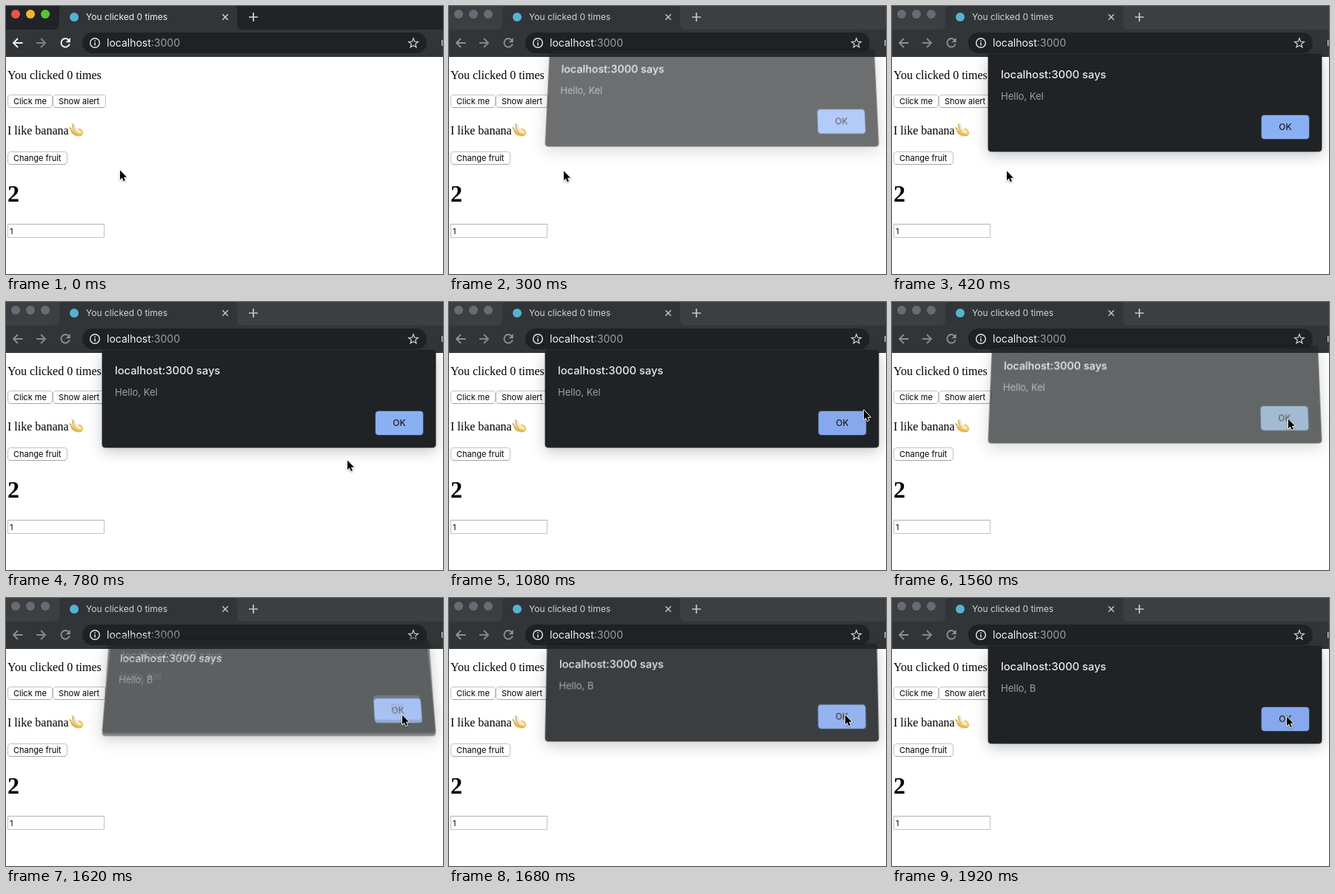
These frames come from a looping animation (590x363 px, 1980 ms). An HTML page with a canvas:

```html
<!DOCTYPE html>
<html lang="en">
<head>
<meta charset="utf-8">
<title>You clicked 0 times</title>
<style>
  html, body { margin: 0; width: 100%; height: 100%; overflow: hidden; background: #fff; }
  canvas, .dialog, #cursor { position: absolute; }
  canvas { left: 0; top: 0; }
  .dialog {
    left: 130px; top: 66px; width: 450px; height: 131px;
    background: #1f2325; border-radius: 4px;
    box-shadow: 0 5px 20px rgba(0, 0, 0, .24), 0 0 0 1px rgba(0, 0, 0, .4);
    transform-origin: 50% 100%; opacity: 0;
    font-family: Inter, sans-serif; white-space: nowrap;
  }
  .dialog * { position: absolute; line-height: 20px; }
  .title { left: 17px; top: 16.5px; font-size: 14.7px; font-weight: 500; color: #e8eaed; }
  .message { left: 17px; top: 46px; font-size: 13px; color: #9aa0a6; }
  .dialog .ok {
    left: 369px; top: 82px; width: 64px; height: 32px; line-height: 32px;
    border-radius: 4px; text-align: center; font-size: 12px; font-weight: 500; color: #202124;
    box-shadow: 0 0 0 1px rgba(138, 176, 244, .25);
  }
  #cursor { left: 0; top: 0; overflow: visible; filter: drop-shadow(0 1px 1px rgba(0, 0, 0, .3)); }
</style>
</head>
<body>
<canvas id="stage" width="590" height="363"></canvas>
<div class="dialog" id="first">
  <div class="title">localhost:3000 says</div>
  <div class="message">Hello, Kel</div>
  <div class="ok">OK</div>
</div>
<div class="dialog" id="second">
  <div class="title">localhost:3000 says</div>
  <div class="message">Hello, B</div>
  <div class="ok">OK</div>
</div>
<svg id="cursor" width="12" height="19">
  <path d="M1 1.5V14.3l2.8-2.7 2 4.6 2.1-.9-2-4.5h4z" fill="#000" stroke="#fff" stroke-width="1.7" stroke-linejoin="round" paint-order="stroke"/>
</svg>
<script>
const LOOP = 1980, STEP = 60;
const SANS = 'Inter, sans-serif', SERIF = '"Liberation Serif", serif';
const $ = id => document.getElementById(id);
const ctx = $('stage').getContext('2d');

// Keys: [time, x, y]
const cursorPath = [
  [60, 153, 221], [120, 154, 222], [540, 154, 222], [600, 176, 222], [720, 405, 215],
  [780, 460, 213], [900, 460, 213], [960, 474, 205], [1080, 559, 145], [1140, 559, 146],
  [1260, 549, 152], [1440, 534, 157], [1860, 534, 157], [1920, 532, 159]
];

// Keys: [time, lift, opacity]
const firstKeys = [
  [180, 22, 0], [240, 15, .33], [300, 7, .66], [360, 2, .9], [420, 0, 1],
  [1500, 0, 1], [1560, 6, .7], [1620, 14.5, .4], [1680, 22, 0]
];
const secondKeys = [[1560, 21, 0], [1620, 10.5, .55], [1680, 3, .88], [1740, 0, 1]];

function at(keys, t) {
  const i = keys.findIndex(k => k[0] > t);
  if (i === 0) return keys[0].slice(1);
  if (i < 0) return keys[keys.length - 1].slice(1);
  const a = keys[i - 1], b = keys[i], p = (t - a[0]) / (b[0] - a[0]);
  return [1, 2].map(n => a[n] + (b[n] - a[n]) * p);
}

function box(x, y, w, h, r, fill, stroke) {
  ctx.beginPath();
  ctx.roundRect(x, y, w, h, r);
  if (fill) { ctx.fillStyle = fill; ctx.fill(); }
  if (stroke) { ctx.strokeStyle = stroke; ctx.lineWidth = 1; ctx.stroke(); }
}

function dot(x, y, r, color) {
  ctx.beginPath();
  ctx.arc(x, y, r, 0, 7);
  ctx.fillStyle = color;
  ctx.fill();
}

function text(str, x, y, font, color) {
  ctx.font = font;
  ctx.fillStyle = color;
  ctx.fillText(str, x, y);
}

function shape(d, color, width) {
  const p = new Path2D(d);
  if (width) {
    ctx.strokeStyle = color;
    ctx.lineWidth = width;
    ctx.stroke(p);
  } else {
    ctx.fillStyle = color;
    ctx.fill(p);
  }
}

function drawChrome(active) {
  const pick = (on, off) => active ? on : off;
  const icon = pick('#f1f3f4', '#8b8e92');

  box(0, 0, 590, 33, 0, pick('#212427', '#3b3f42'));
  ['#ee5249', '#f2b52f', '#5bc138'].forEach((c, i) => dot(13 + 20 * i, 11, 6, pick(c, '#686c70')));
  shape('M64 32Q72 32 72 24V6Q72 -2 80 -2H304Q312 -2 312 6V24Q312 32 320 32Z', '#313538');
  box(0, 32, 590, 37, 0, '#313538');

  dot(92, 15, 6, '#56b4cf');
  text('You clicked 0 times', 108, 19, '12px ' + SANS, pick('#f1f3f4', '#d0d3d6'));
  shape('M292.3 11.3l7.4 7.4M299.7 11.3l-7.4 7.4', pick('#d5d7da', '#c4c7ca'), 1.4);
  shape('M328 15h12M334 9v12', pick('#d5d7da', '#c4c7ca'), 1.7);

  shape('M22.5 50H10.5M16 44l-6 6 6 6', icon, 1.9);
  shape('M41 50h12M47 44l6 6-6 6', pick('#7d8084', '#84878b'), 1.9);
  shape('M84.8 46.2A5.8 5.8 0 1 0 85.8 51.5', icon, 1.9);
  shape('M86.8 43v6.3h-6.3z', icon);

  box(103, 36, 465, 28, 14, '#1f2224');
  shape('M126.3 50a6.3 6.3 0 1 1-12.6 0a6.3 6.3 0 1 1 12.6 0', '#e8eaed', 1.4);
  shape('M120 49.2v4.2M120 46.4v1.5', '#e8eaed', 1.5);
  text('localhost', 136, 55, '14px ' + SANS, '#f1f3f4');
  const hostWidth = ctx.measureText('localhost').width;
  text(':3000', 136 + hostWidth, 55, '14px ' + SANS, '#9aa0a6');

  ctx.beginPath();
  for (let i = 0; i < 10; i++) {
    const r = i % 2 ? 2.9 : 6.7, a = Math.PI * (i / 5 - .5);
    ctx.lineTo(550 + r * Math.cos(a), 50.5 + r * Math.sin(a));
  }
  ctx.closePath();
  ctx.strokeStyle = '#c8cbce';
  ctx.lineWidth = 1.3;
  ctx.stroke();
  box(588, 46, 1.4, 8, 0, '#c8cbce');
}

function button(label, x, y, w) {
  box(x + .5, y + .5, w - 1, 17, 3.5, '#fff', '#c0c0c0');
  shape(`M${x + 3} ${y + 17.5}h${w - 6}`, '#a3a3a3', 1);
  text(label, x + 8, y + 13, '11px ' + SANS, '#000');
}

function drawBanana() {
  shape('M89 160Q91 157 93 160Q94 166 98 169L93 174Q88 168 89 160Z', '#f3e6bd');
  shape('M89.5 159.5Q90 167 94 171', '#b99a5c', 1);
  shape('M86 165Q90 166 92 170Q95 172 97 166Q101 165 104 170Q105 174 102 176Q94 178 89 173Q87 169 86 165Z', '#eccb6a');
  shape('M95 167Q100 167 102 172Q99 173 96 171Z', '#f7eecb');
  shape('M88 169Q92 175 101 175', '#cf9d37', 1.1);
  shape('M85.5 164l2.2 1.2-.6 1.8z', '#806026');
}

function drawPage() {
  box(0, 69, 590, 294, 0, '#fff');
  text('You clicked 0 times', 2, 99, '16px ' + SERIF, '#000');
  button('Click me', 2, 120, 61);
  button('Show alert', 63, 120, 72);
  text('I like banana', 2, 174, '16px ' + SERIF, '#000');
  drawBanana();
  button('Change fruit', 2, 197, 81);
  text('2', 2, 265, 'bold 32px ' + SERIF, '#000');
  box(2.5, 295.5, 130, 18, 0, '#fff', '#c3c3c3');
  shape('M2 295.5h131', '#b0b0b0', 1);
  text('1', 5, 309, '11px ' + SANS, '#000');
}

// Tilts the sheet back from its bottom edge while lifting it.
function placeDialog(el, [lift, opacity], buttonColor) {
  const k = 1 / (1 - lift * .9 / 225), g = (k - 1) / 131;
  el.style.opacity = opacity;
  el.style.transform = lift ? `matrix3d(1,0,0,0,0,${k},0,${-g},0,0,1,0,0,${-lift},0,1)` : 'none';
  el.querySelector('.ok').style.background = buttonColor;
}

function render(now) {
  const t = Math.floor((now % LOOP) / STEP) * STEP;
  const [x, y] = at(cursorPath, t);
  const hover = x > 499 && x < 563 && y < 180;
  const fill = hover ? '#86a9ee' : '#8ab0f4';
  const pressed = t === 1500 || t === 1560;

  drawChrome(t < 240);
  drawPage();
  placeDialog($('first'), at(firstKeys, t), pressed ? '#7b9dbe' : fill);
  placeDialog($('second'), at(secondKeys, t), fill);
  $('cursor').style.transform = `translate(${Math.round(x)}px, ${Math.round(y)}px)`;
}

const start = performance.now();
function tick() {
  render(performance.now() - start);
  requestAnimationFrame(tick);
}
tick();
</script>
</body>
</html>
```
